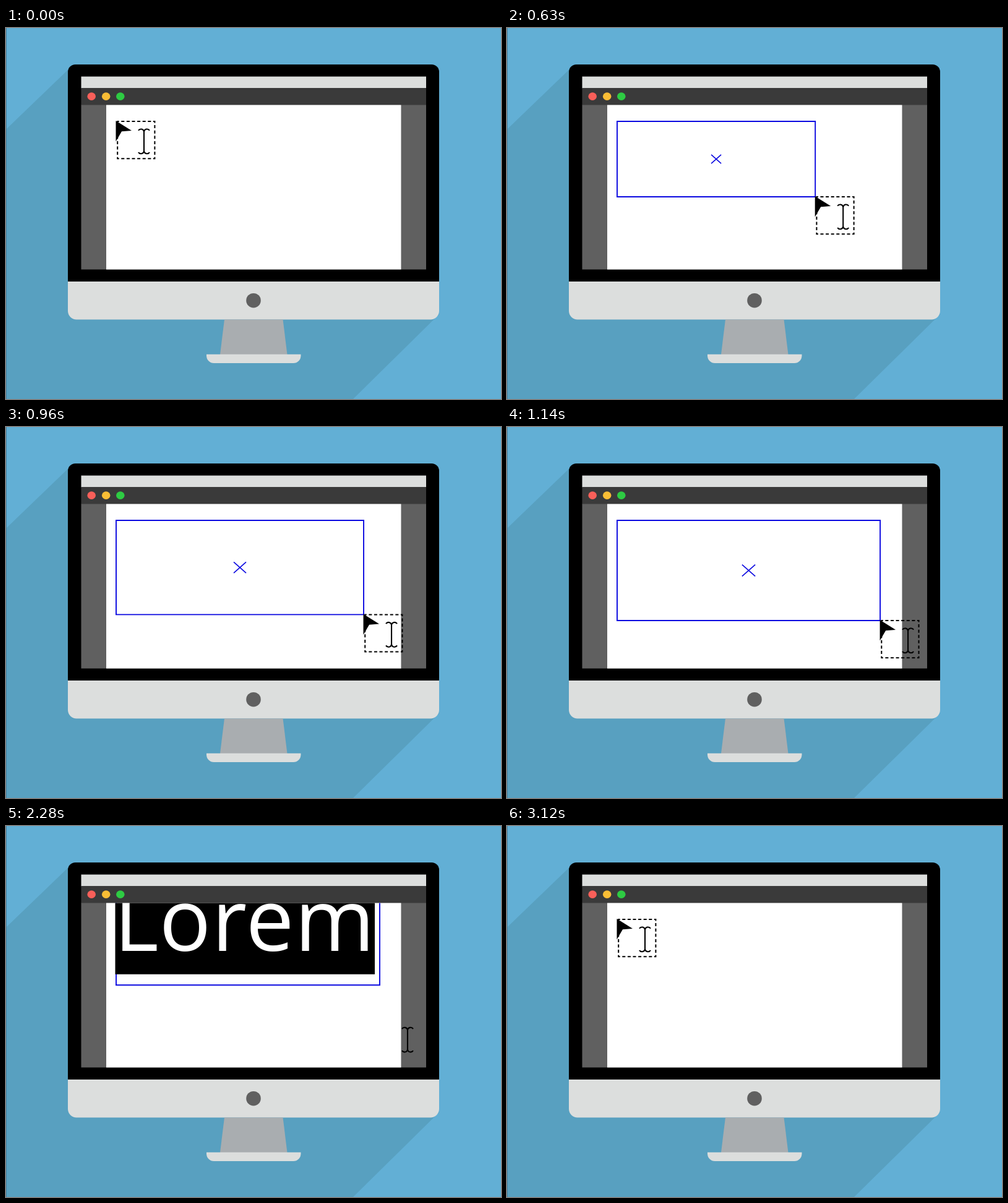
Recreate the animation shown at these times as an HTML page. Size 800 px wide and 600 px high, loop 3.45 s.

```html
<!DOCTYPE html>
<html lang="en">
<head>
<meta charset="utf-8">
<title>Text frame on a desktop screen</title>
<style>
  html, body { margin: 0; width: 100%; height: 100%; overflow: hidden; background: #62afd5; }
  svg { display: block; width: 100vw; height: 100vh; }
</style>
</head>
<body>
<svg viewBox="0 0 800 600">
  <defs>
    <clipPath id="view"><rect x="121.5" y="124.5" width="557.5" height="266"/></clipPath>
  </defs>

  <rect width="800" height="600" fill="#62afd5"/>
  <path d="M108 60L0 164V600H561L700 463Z" fill="#58a0c0"/>
  <rect width="1" height="600" fill="#477f9b"/>

  <path d="M100 410V71a12 12 0 0 1 12-12H688a12 12 0 0 1 12 12V410Z"/>
  <path d="M100 410H700V457.500a14 14 0 0 1-14 14H114a14 14 0 0 1-14-14Z" fill="#dcdedd"/>
  <circle cx="400" cy="440.700" r="11.800" fill="#606060"/>
  <path d="M353 471.500H447.500L454.500 528H346Z" fill="#a9adb0"/>
  <path d="M324 527.700H476.500V530a12 12 0 0 1-12 12H336a12 12 0 0 1-12-12Z" fill="#dcdedd"/>

  <rect x="121.500" y="78.500" width="557.500" height="19" fill="#dcdedd"/>
  <rect x="121.500" y="97" width="557.500" height="28" fill="#3a3a3a"/>
  <rect x="121.500" y="124.500" width="557.500" height="266" fill="#606060"/>
  <rect x="162" y="124.500" width="476.500" height="266" fill="#fff"/>
  <ellipse cx="138.200" cy="110.600" rx="6.800" ry="6.300" fill="#f95f59"/>
  <ellipse cx="161.700" cy="110.600" rx="6.800" ry="6.300" fill="#f9bd35"/>
  <ellipse cx="184.800" cy="110.600" rx="6.800" ry="6.300" fill="#2ecb43"/>

  <g clip-path="url(#view)">
    <g id="page">
      <path id="frame" fill="none" stroke="#0a08e0" stroke-width="1.900"/>
      <g id="label">
        <rect x="176.500" y="134.800" width="419.500" height="161"/>
        <text x="174.400" y="258" fill="#fff" font-family="'Open Sans', 'Noto Sans', sans-serif"
          font-size="139" letter-spacing="1">Lorem</text>
      </g>
    </g>
  </g>
  <path id="cross" fill="none" stroke="#0a08e0" stroke-width="1.600"/>

  <g id="cursor">
    <g id="tool">
      <rect x="2.200" y="0" width="60.200" height="60.200" fill="none" stroke="#000" stroke-width="2"
        stroke-dasharray="5 3.600" stroke-dashoffset="2.500"/>
      <path d="M0 3V37H4V3Z" fill="#fff" id="gap"/>
      <path d="M-.5-1L25 15 9 16.300-.5 32.500Z"/>
    </g>
    <path d="M36 14.800C38 11.500 44 11.500 45 16.500C46 11.500 52 11.500 54 14.800M45 16V49
      M36 50C38 53.300 44 53.300 45 48.300C46 53.300 52 53.300 54 50"
      fill="none" stroke="#000" stroke-width="2.100"/>
  </g>
</svg>

<script>
const LOOP = 3450, STEP = 30;
const START = { x: 178, y: 151 };
const RATIO = 0.381;
const MID = 320, FULL = 426;
const SCROLLS = [[2280, 56], [2520, 108], [2640, 160], [2790, 212]];

const el = id => document.getElementById(id);
const show = (id, on) => el(id).setAttribute("display", on ? "inline" : "none");
const move = (id, x, y) => el(id).setAttribute("transform", `translate(${x} ${y})`);
const corner = w => ({ x: START.x + w, y: START.y + w * RATIO });

// Symmetric ease with two-thirds influence on both ends.
function ease(p) {
  if (p <= 0) return 0;
  if (p >= 1) return 1;
  let lo = 0, hi = 1, s = 0.5;
  for (let i = 0; i < 24; i++) {
    const r = 1 - s;
    if (2 * r * r * s + r * s * s + s ** 3 < p) lo = s; else hi = s;
    s = (lo + hi) / 2;
  }
  return s * s * (3 - 2 * s);
}

const span = (t, from, to) => ease((t - from) / (to - from));

// The way back swings slightly above the starting point.
function arc(u) {
  const end = corner(FULL), r = 1 - u;
  const bend = (a, b, c) => r * r * a + 2 * r * u * b + u * u * c;
  return { x: bend(end.x, 391, START.x), y: bend(end.y, 94, START.y) };
}

function draw(t) {
  const width = MID * span(t, 0, 450) + (FULL - MID) * span(t, 600, 1200);
  const tip = corner(width);
  const typed = t >= 1380, done = t >= 2790;

  show("frame", width > 0 && !done);
  show("label", typed && !done);
  show("cross", width > 0 && !typed);
  el("frame").setAttribute("d", `M${START.x} ${START.y}H${tip.x}V${tip.y}H${START.x}Z`);

  const dx = width * 0.025, dy = width * RATIO * 0.058;
  const cx = START.x + width / 2, cy = START.y + width * RATIO / 2;
  el("cross").setAttribute("d",
    `M${cx - dx} ${cy - dy}L${cx + dx} ${cy + dy}M${cx - dx} ${cy + dy}L${cx + dx} ${cy - dy}`);

  const scroll = SCROLLS.reduce((y, [time, value]) => t >= time ? value : y, 0);
  move("page", 0, -scroll);

  const pos = t < 2970 ? tip : arc(span(t, 2970, 3120));
  move("cursor", pos.x, pos.y);
  show("tool", !typed || t >= 2970);
  show("gap", false);
}

function tick() {
  const t = performance.now() % LOOP;
  draw(Math.floor(t / STEP) * STEP);
  requestAnimationFrame(tick);
}
tick();
</script>
</body>
</html>
```
